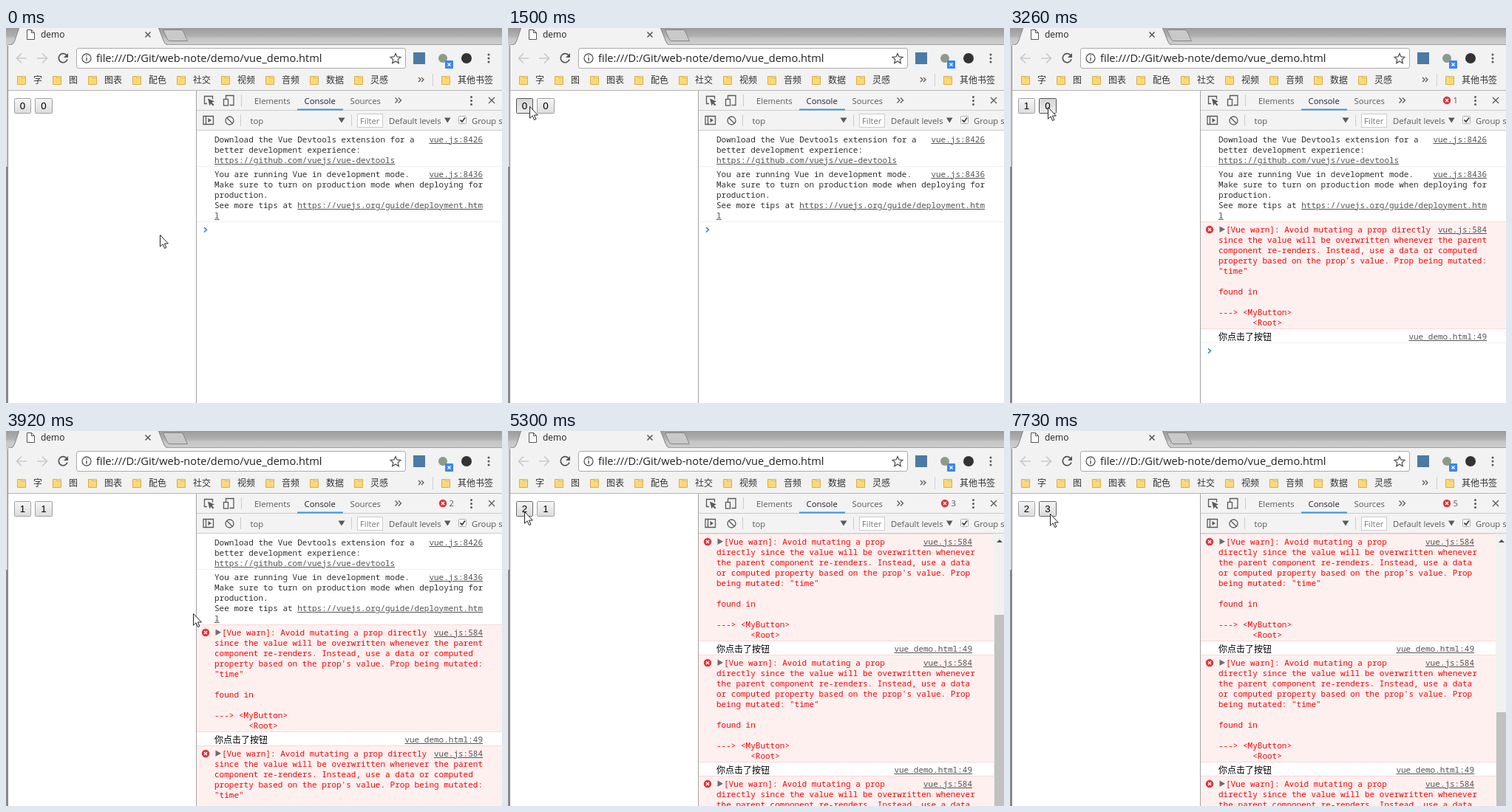
Animation, 671 px wide and 508 px high, one loop 8.39 s. Source, as an HTML page:

```html
<!DOCTYPE html>
<html lang="zh">
<head>
<meta charset="utf-8">
<title>demo</title>
<style>
html, body { margin: 0; width: 100%; height: 100%; overflow: hidden; background: #fff; }
#stage { position: absolute; left: 0; top: 0; width: 671px; height: 508px; overflow: hidden; }
svg { position: absolute; left: 0; top: 0; display: block; }
text { font-family: "Open Sans", "Noto Sans", sans-serif; white-space: pre; }
.ui text { font-size: 11.3px; fill: #5a5a5a; }
.marks text { font: 12px "Noto Sans CJK SC", "Noto Sans CJK", sans-serif; fill: #333; }
.line { fill: none; stroke: #5a5a5a; stroke-width: 1.3; }
.btn rect { fill: url(#face); stroke: #a0a0a0; }
.btn.hover rect { fill: url(#lit); stroke: #686868; }
.btn.down rect { fill: url(#pressed); stroke: #555; }
.btn text { font: 13.33px "Liberation Sans", Arial, sans-serif; text-anchor: middle; fill: #000; }
#log { position: absolute; left: 258px; top: 140px; width: 413px; height: 368px; overflow: hidden; background: #fff;
  font: 11px/14px "Noto Sans Mono", "Noto Sans CJK SC", "Liberation Mono", monospace; color: #303030; }
#log.narrow { top: 139px; height: 369px; }
.msg { position: relative; box-sizing: border-box; border-top: 1px solid #f0f0f0; padding: 3px 0 1px 24px; white-space: pre; }
.msg:first-child { border-color: transparent; }
.err { background: #fff0f0; color: #f00; border-color: #ffd6d6 !important; }
.err + .msg { border-color: #ffd6d6; }
.said { height: 19px; color: #000; }
.said b { font: 12px/14px "Noto Sans CJK SC", "Noto Sans CJK", sans-serif; }
u { color: #545454; }
.src { position: absolute; right: 26px; top: 3px; }
.narrow .src { right: 43px; }
.msg svg { left: 0; top: 0; }
.tri { display: inline-block; width: 10px; }
</style>
</head>
<body>
<div id="stage">
<svg id="base" width="671" height="508" viewBox="0 0 671 508">
  <defs>
    <linearGradient id="title" x2="0" y2="1">
      <stop stop-color="#9c9c9c"/><stop offset=".45" stop-color="#b0b0b0"/>
      <stop offset=".6" stop-color="#c6c6c6"/><stop offset="1" stop-color="#cecece"/>
    </linearGradient>
    <linearGradient id="face" x2="0" y2="1"><stop stop-color="#f6f6f6"/><stop offset="1" stop-color="#dcdcdc"/></linearGradient>
    <linearGradient id="lit" x2="0" y2="1"><stop stop-color="#f4f4f4"/><stop offset="1" stop-color="#dadada"/></linearGradient>
    <linearGradient id="pressed" x2="0" y2="1"><stop stop-color="#d6d6d6"/><stop offset="1" stop-color="#ececec"/></linearGradient>
    <g id="folder"><path d="M.5 1.5h5v2h6v9h-11z" fill="#fbd978" stroke="#dcae45"/><path d="M6 1.5h5.5V4" fill="none" stroke="#dcae45"/></g>
    <g id="dots" fill="#5a5a5a"><circle cy="-5" r="1.5"/><circle r="1.5"/><circle cy="5" r="1.5"/></g>
    <g id="bad"><circle r="5.2" fill="#e0343a"/><path d="M-2-2l4 4m0-4l-4 4" stroke="#fff" stroke-width="1.3"/></g>
  </defs>

  <!-- window and tab strip -->
  <rect width="671" height="508" fill="#fff"/>
  <rect width="671" height="24" fill="url(#title)"/>
  <rect y="24" width="3" height="164" fill="#d6d6d6"/>
  <rect y="188" width="3" height="320" fill="#8a8a8a"/>
  <rect x="3" y="23" width="668" height="61" fill="#f2f2f2"/>
  <path d="M3 22.5H671" stroke="#a0a0a0"/>
  <path d="M7 23.5Q10 22 11.5 18L18-1H206L213.500 18Q215 22 218 23.500z" fill="#f2f2f2"/>
  <path d="M7 22.500Q10 22 11.500 18L18-1M206-1L213.500 18Q215 22 218 22.500" fill="none" stroke="#858585"/>
  <path d="M212.500 2.500H237Q239 2.500 240 5L245.500 17.500H222Q219 17.500 218 15z" fill="#c9c9c9" stroke="#858585"/>
  <path d="M28.500 2.500h6l4 4v9h-10zM34.500 2.500v4h4" fill="#fff" stroke="#555"/>
  <text x="47" y="13" font-size="12" fill="#222">demo</text>
  <path d="M188.500 5.500l7 7m0-7l-7 7" stroke="#555" stroke-width="1.500"/>

  <!-- address row -->
  <g fill="none" stroke="#cacaca" stroke-width="1.700">
    <path d="M28 41H15M21 34.500L14.500 41L21 47.500M42 41H55M49 34.500L55.500 41L49 47.500"/>
    <path d="M82 37A6 6 0 1 0 83 42.500" stroke="#555"/>
  </g>
  <path d="M84 34v6h-6z" fill="#555"/>
  <rect x="95.500" y="27.500" width="445" height="27" rx="2.500" fill="#fff" stroke="#ababab"/>
  <circle cx="109" cy="41" r="6" class="line"/>
  <path d="M109 40v4.500M109 37v1.600" stroke="#5a5a5a" stroke-width="1.500"/>
  <text x="122" y="46" font-size="14.600" fill="#222">file:///D:/Git/web-note/demo/vue_demo.html</text>
  <path d="M527 34.500l2 4.500 4.900.5-3.700 3.300 1.100 4.800-4.300-2.500-4.300 2.500 1.100-4.800-3.700-3.300 4.900-.5z" class="line"/>
  <rect x="551" y="33" width="16" height="16" fill="#4a7ba6"/>
  <circle cx="591" cy="41" r="6" fill="#8d9a8a"/>
  <rect x="594" y="44" width="11" height="11" rx="1" fill="#3b86f0"/>
  <path d="M597.500 47.500l4 4m0-4l-4 4" stroke="#fff" stroke-width="1.200"/>
  <circle cx="623" cy="41" r="7" fill="#333"/>
  <use href="#dots" x="653" y="41"/>

  <!-- bookmarks -->
  <g class="marks" id="marks"></g>
  <path d="M558 67l3 3-3 3m4-6l3 3-3 3" class="line"/>
  <path d="M577.500 62v17" stroke="#d0d0d0"/>
  <path d="M3 84.500H671" stroke="#b6b6b6"/>
  <path d="M2.500 24V508" stroke="#858585"/>

  <!-- page -->
  <g class="btn"><rect x="11.500" y="95.500" width="22" height="20" rx="1"/><text x="22.500" y="110">0</text></g>
  <g class="btn"><rect x="39.500" y="95.500" width="23" height="20" rx="1"/><text x="51" y="110">0</text></g>

  <!-- developer panel -->
  <rect x="258" y="85" width="413" height="53" fill="#f3f3f3"/>
  <path d="M257.500 85V508" stroke="#a3a3a3"/>
  <path d="M258 111.500H671M258 138.500H671M318.500 90v16M317.500 117v16M467.500 117v16" stroke="#ccc"/>
  <g class="line">
    <path d="M272 102.500h-3.500v-10h11v4"/>
    <path d="M297.500 96v-4.500h10.500v13h-5.500"/>
    <rect x="294.500" y="96.500" width="6" height="8.500"/>
    <path d="M526.500 94.500l3.500 3.500-3.500 3.500m4.500-7l3.500 3.500-3.500 3.500"/>
    <path d="M653 94l8 8m0-8l-8 8"/>
    <path d="M267 119.500h13.500v11H267zM270.500 119.500v11"/>
    <circle cx="302.500" cy="125.500" r="5.500"/><path d="M298.500 121.500l8 8"/>
  </g>
  <g fill="#5a5a5a">
    <path d="M273 95.500l9 4-3.500 1.500 3 3-1.500 1.500-3-3-1.500 3z"/>
    <path d="M273.500 122l4.500 3-4.500 3z"/>
    <path d="M449.500 121.500h9l-4.500 7zM593 121.500h8.500l-4.200 7z"/>
  </g>
  <use href="#dots" x="629.500" y="98.500"/>
  <rect x="394" y="109.500" width="62" height="2" fill="#3d94e0"/>
  <rect x="475.500" y="116.500" width="34" height="18" fill="#fff" stroke="#ccc"/>
  <rect x="612.500" y="119.500" width="10" height="10" rx="1" fill="#fff" stroke="#aaa"/>
  <path d="M614.500 124.500l2.500 2.500 4-5.500" fill="none" stroke="#444" stroke-width="1.800"/>
  <g class="ui">
    <text x="336" y="103">Elements</text>
    <text x="403.500" y="103" style="fill:#222">Console</text>
    <text x="465.500" y="103">Sources</text>
    <text x="330.500" y="130">top</text>
    <text x="479" y="130" style="fill:#777">Filter</text>
    <text x="518" y="130">Default levels</text>
    <text x="630" y="130">Group similar</text>
    <g id="count"><use href="#bad" x="591" y="98"/><text x="599.500" y="102"></text></g>
  </g>
</svg>

<div id="log"></div>

<svg width="671" height="508" viewBox="0 0 671 508">
  <g id="bar">
    <rect x="657" y="139" width="14" height="369" fill="#f1f1f1"/>
    <path d="M661 151l4-4 4 4z" fill="#505050"/>
    <rect id="thumb" x="658" width="13" height="300" fill="#c1c1c1"/>
  </g>
  <path id="cursor" d="M.5.500v15.700l3.600-3.400 2.500 5.700 2.300-1-2.500-5.500h5z" fill="#fff" stroke="#222"/>
</svg>
</div>

<script>
const LOOP = 8390;
const $ = id => document.getElementById(id);

// start, end, steps, destination
const MOVES = [
  [80, 860, 9, 32, 110],
  [950, 950, 1, 30, 108],
  [1120, 1120, 1, 29, 106],
  [2610, 2610, 1, 30, 106],
  [2710, 3000, 4, 51, 107],
  [3720, 3920, 3, 253, 247],
  [4010, 4100, 2, 303, 267],
  [4460, 5010, 7, 22, 109],
  [6230, 6600, 5, 55, 114],
  [7180, 7180, 1, 54, 112]
];
// button, press, value change, console report
const CLICKS = [
  [0, 1500, 1690, 1800],
  [1, 3260, 3460, 3460],
  [0, 5110, 5200, 5300],
  [1, 6690, 6790, 6880],
  [1, 7630, 7730, 7730]
];
const THUMB = { 3: 249, 4: 328, 5: 381 };

const marks = { 15: '字', 63: '图', 111: '图表', 171: '配色', 231: '社交', 291: '视频',
  351: '音频', 411: '数据', 471: '灵感', 589: '其他书签' };
$('marks').innerHTML = Object.entries(marks).map(([x, name]) =>
  `<use href="#folder" x="${x}" y="64"/><text x="${+x + 22}" y="75">${name}</text>`).join('');

const msg = (cls, src, body) =>
  `<div class="msg ${cls}">${src ? `<u class="src">${src}</u>` : ''}${body}</div>`;

const intro = msg('', 'vue.js:8426', `Download the Vue Devtools extension for a
better development experience:
<u>https://github.com/vuejs/vue-devtools</u>`) +
  msg('', 'vue.js:8436', `You are running Vue in development mode.
Make sure to turn on production mode when deploying for
production.
See more tips at <u>https://vuejs.org/guide/deployment.htm
l</u>`);

const wide = `[Vue warn]: Avoid mutating a prop directly
since the value will be overwritten whenever the parent
component re-renders. Instead, use a data or computed
property based on the prop's value. Prop being mutated:
"time"`;
const narrow = `[Vue warn]: Avoid mutating a prop
directly since the value will be overwritten whenever
the parent component re-renders. Instead, use a data
or computed property based on the prop's value. Prop
being mutated: "time"`;

const report = warning => msg('err', 'vue.js:584',
  '<svg width="24" height="19"><use href="#bad" x="12" y="10"/>' +
  '<path d="M25.500 6.500l7 4-7 4z" fill="#6e6e6e"/></svg>' +
  '<svg style="left:24px" width="12" height="19"><path d="M1.500 5.500l7.500 4.300-7.500 4.300z" fill="#6e6e6e"/></svg>' +
  `<span class="tri"></span>${warning}\n\nfound in\n\n---&gt; &lt;MyButton&gt;\n       &lt;Root&gt;`) +
  msg('said', 'vue_demo.html:49', '<b>你点击了按钮</b>');

const prompt = msg('', '', '<svg width="24" height="19"><path d="M10 7l3.500 3.300L10 13.600" fill="none" stroke="#3a87e8" stroke-width="1.600"/></svg> ');

const ease = p => p * p * (3 - 2 * p);

function cursorAt(t) {
  let x = 208, y = 280;
  for (const [start, end, n, tx, ty] of MOVES) {
    if (t < start) break;
    const gap = n > 1 ? (end - start) / (n - 1) : 1;
    const k = Math.min(n, 1 + Math.floor((t - start) / gap + 1e-6));
    const p = ease(k / n);
    x += (tx - x) * p;
    y += (ty - y) * p;
  }
  return [Math.round(x), Math.round(y)];
}

let shown = -1;
function showErrors(n) {
  if (n === shown) return;
  shown = n;
  const full = n > 2;
  $('log').className = full ? 'narrow' : '';
  $('log').innerHTML = full ? report(narrow).repeat(3) : intro + report(wide).repeat(n) + prompt;
  $('count').style.display = n ? '' : 'none';
  $('count').lastChild.textContent = n;
  $('bar').style.display = full ? '' : 'none';
  if (full) $('thumb').setAttribute('y', THUMB[n]);
}

const buttons = [...document.querySelectorAll('.btn')];
const edges = [[11, 34], [39, 63]];

function draw(t) {
  const [x, y] = cursorAt(t);
  $('cursor').setAttribute('transform', `translate(${x} ${y})`);
  buttons.forEach((b, i) => {
    const mine = CLICKS.filter(c => c[0] === i);
    const over = x >= edges[i][0] && x < edges[i][1] && y >= 95 && y < 116;
    const down = mine.some(c => t >= c[1] && t < c[2]);
    b.setAttribute('class', 'btn' + (down ? ' down' : over ? ' hover' : ''));
    b.lastChild.textContent = mine.filter(c => t >= c[2]).length;
  });
  showErrors(CLICKS.filter(c => t >= c[3]).length);
}

const begin = performance.now();
function tick() {
  draw((performance.now() - begin) % LOOP);
  requestAnimationFrame(tick);
}
tick();
</script>
</body>
</html>
```
